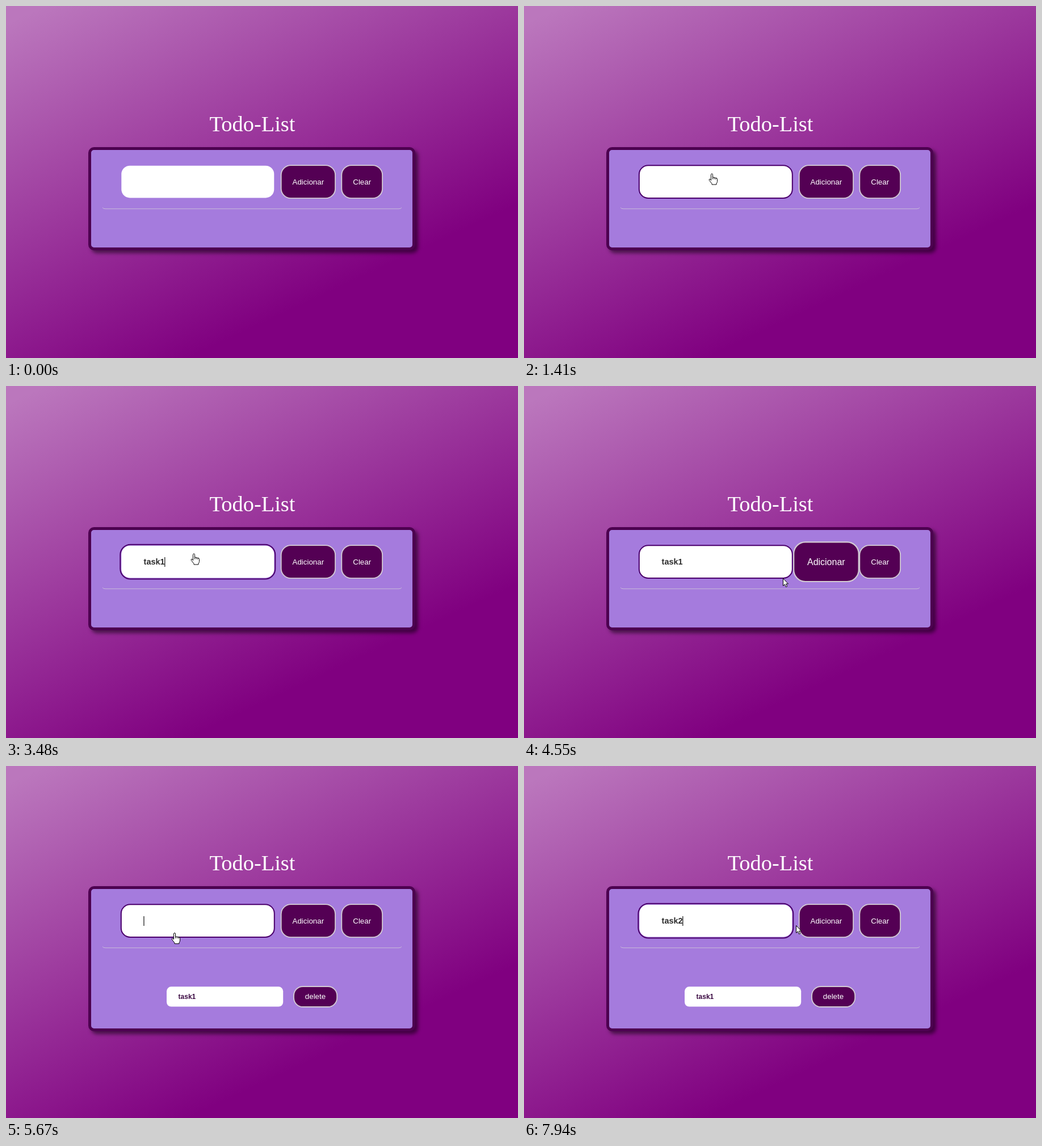
Recreate the animation shown at these times as an HTML page. Size 902x621 px, loop 8000 ms.

```html
<!DOCTYPE html>
<html lang="pt">
<head>
<meta charset="utf-8">
<title>Todo-List</title>
<style>
html, body { margin: 0; width: 100%; height: 100%; overflow: hidden; }
body { background: linear-gradient(155deg, #bb77bd 3%, #800080 74%); }
svg { display: block; width: 902px; height: 621px; }
text { font: 13.33px Arial, "Liberation Sans", sans-serif; fill: #fff; text-anchor: middle; }
#title { font: 38.4px "Times New Roman", "Liberation Serif", serif; }
#value, #item { font-weight: bold; text-anchor: start; fill: #2b2b2b; }
#value { font-size: 14.4px; }
#item { font-size: 12px; fill: #3c0a43; }
#card { fill: #a57bdd; stroke: #4d0050; stroke-width: 5; filter: drop-shadow(5px 5px 3px rgba(0,0,0,.5)); }
.button rect { fill: #540054; stroke: #d3cbd3; stroke-width: 1.8; }
.ring { fill: none; stroke: #4b006c; stroke-width: 2; }
.pointer { fill: #fff; stroke: #000; stroke-linejoin: round; }
</style>
</head>
<body>
<svg viewBox="0 0 902 621">
  <rect id="card" x="147.5" y="251.5" width="571" height="177" rx="7.5"/>
  <g id="form">
    <text id="title" x="434" y="221">Todo-List</text>
    <rect x="203.3" y="281.7" width="269" height="56.8" rx="15" fill="#fff"/>
    <rect id="border" class="ring" x="202.8" y="281.2" width="270" height="57.8" rx="16"/>
    <rect id="outline" class="ring" x="201.3" y="279.8" width="273" height="60.8" rx="18"/>
    <text id="value" x="242.6" y="315"></text>
    <rect id="caret" y="302" width="1.3" height="17" fill="#222"/>
    <g id="add" class="button">
      <rect x="484.7" y="281.2" width="95.4" height="58" rx="17"/>
      <text x="532.3" y="315">Adicionar</text>
    </g>
    <g class="button">
      <rect x="591.3" y="281.2" width="71.8" height="58" rx="17"/>
      <text x="627.2" y="315">Clear</text>
    </g>
    <path d="M170 355.5q1 2.3 5 2.3H692q4 0 5-2.3" fill="none" stroke="#cabcd9"/>
  </g>
  <g id="row">
    <rect x="283" y="389.3" width="205.2" height="35.2" rx="8" fill="#fff"/>
    <text id="item" x="303.6" y="411">task1</text>
    <g class="button">
      <rect x="507" y="389" width="76.2" height="36" rx="16"/>
      <text x="545" y="411">delete</text>
    </g>
  </g>
  <circle id="click" r="11.5" fill="#ff0" fill-opacity=".47"/>
  <g id="cursor">
    <path id="arrow" class="pointer" d="M.5.5V13.5L3.4 10.8 5.4 15.5 7.6 14.5 5.6 10H9.5Z"/>
    <g id="hand">
      <path class="pointer" d="M-1.5 11.5V1.5Q-1.4 0 0 0T1.5 1.5V6.5Q2.8 5.4 4.2 6.9 5.8 6 6.9 7.5 9.5 7 9.5 9.5V13.5Q9.5 15.5 8 17V19H0V17.5L-4.6 11.5Q-5.5 9.7-4 9.3-2.9 9.3-1.5 11.5Z"/>
      <path class="pointer" d="M1.5 6.5V9.5M4.2 6.9V9.5M6.9 7.5V10"/>
    </g>
  </g>
</svg>
<script>
const LOOP = 8000, ADDED = 4630, SHIFT = 37;
const el = id => document.getElementById(id);
const show = (id, on) => el(id).style.display = on ? "" : "none";
const within = (t, ...spans) => spans.some(([a, b]) => t >= a && t < b);
const clamp = v => Math.max(0, Math.min(1, v));

// Held pointer positions along a quadratic curve
const glide = (t0, t1, steps, a, b, c) => Array.from({ length: steps }, (_, i) => {
  const u = i / (steps - 1), v = 1 - u;
  const mix = k => v * v * a[k] + 2 * u * v * b[k] + u * u * c[k];
  return [t0 + (t1 - t0) * u, mix(0), mix(1)];
});

const path = [
  ...glide(250, 1000, 11, [858, 368], [640, -54], [331, 296]),
  ...glide(3960, 4230, 5, [370, 299], [450, 304], [528, 312]),
  [4550, 456, 339], [4630, 385, 339],
  ...glide(4690, 5010, 6, [350, 334], [305, 326], [297, 294.5]),
  [7870, 392, 291], [7940, 479, 281]
];
const typed = [
  [0, ""], [2620, "t"], [2750, "ta"], [2870, "tas"], [3150, "task"], [3480, "task1"],
  [ADDED, ""], [6400, "t"], [6590, "ta"], [6810, "tas"], [7060, "task"], [7480, "task2"]
];
const latest = (list, t) => list.filter(k => k[0] <= t + .01).pop();

function overInput(t) {
  const p = latest(path, t);
  if (!p) return false;
  const y = p[2] + (t >= ADDED ? SHIFT : 0);
  return p[1] > 202 && p[1] < 474 && y > 280 && y < 340;
}

function draw(t) {
  const added = t >= ADDED, up = added ? SHIFT : 0;
  el("form").setAttribute("transform", `translate(0 ${-up})`);
  el("card").setAttribute("y", 251.5 - up);
  el("card").setAttribute("height", 177 + 2 * up);
  show("row", added);

  const text = latest(typed, t)[1];
  el("value").textContent = text;
  el("caret").setAttribute("x", 242.3 + (text ? 4.8 + 8.01 * (text.length - 1) : 0));
  show("caret", within(t, [1550, 2010], [2540, 4010], [5670, LOOP]));

  const focused = within(t, [1610, 4420], [5740, LOOP]);
  show("outline", focused);
  show("border", overInput(t) && !focused);

  const scale = added ? 1 : 1 + .2 * clamp((t - 4130) / 100);
  el("add").setAttribute("transform", `translate(532.3 310.2) scale(${scale}) translate(-532.3 -310.2)`);

  const p = latest(path, t), hand = overInput(t) && overInput(t - 80);
  show("cursor", p);
  show("hand", hand);
  show("arrow", !hand);
  show("click", within(t, [1340, 1410], [4420, 4490], [5340, 5400]));
  if (p) for (const id of ["cursor", "click"])
    el(id).setAttribute("transform", `translate(${p[1]} ${p[2]})`);
}

const start = performance.now();
function tick() {
  draw((performance.now() - start) % LOOP);
  requestAnimationFrame(tick);
}
tick();
</script>
</body>
</html>
```
